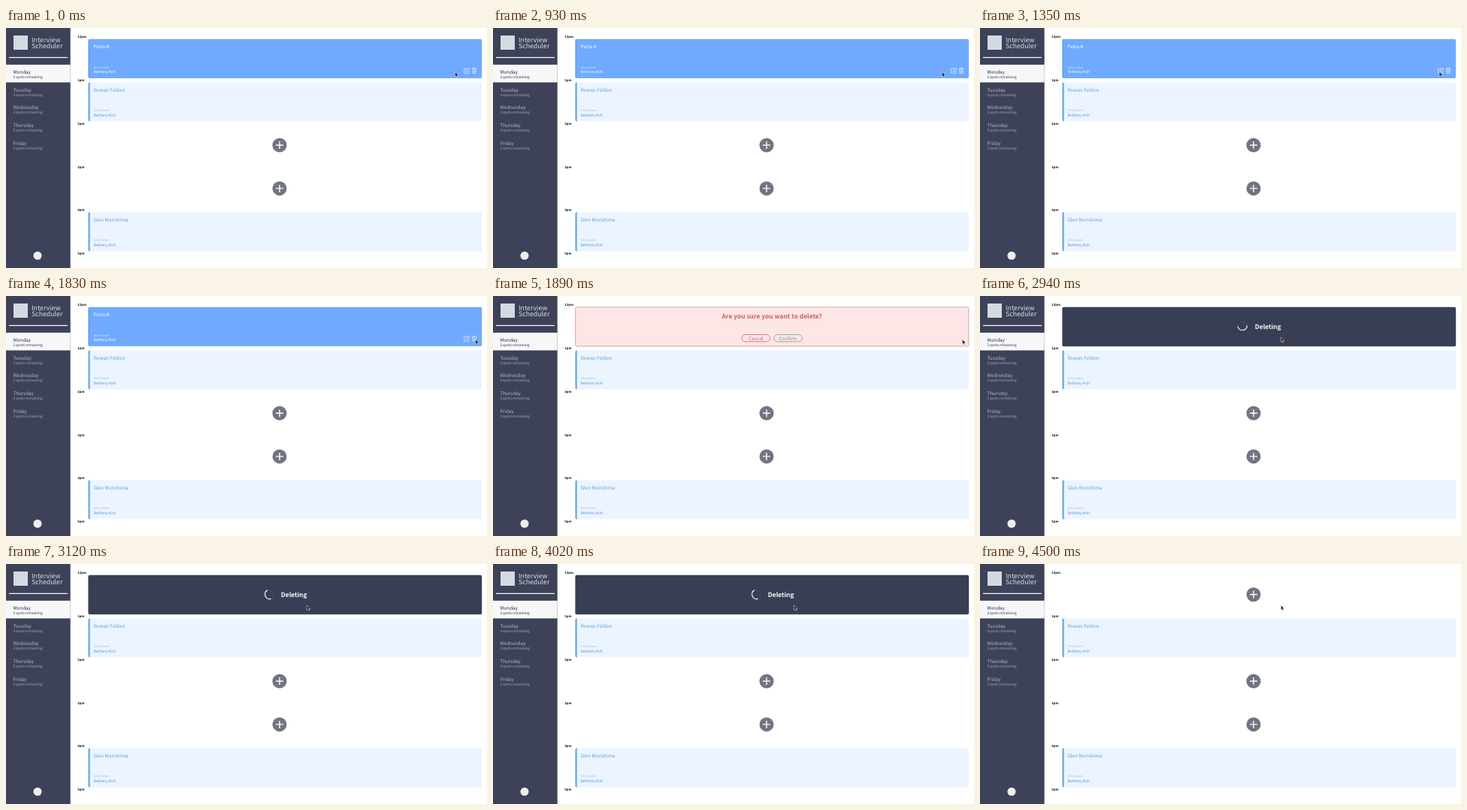
Animation of 640x320 px, one loop 5190 ms. Source, as an HTML page:

```html
<!DOCTYPE html>
<html lang="en">
<head>
<meta charset="utf-8">
<title>Interview Scheduler</title>
<style>
  html, body { margin: 0; width: 100%; height: 100%; overflow: hidden; background: #fff; }
  svg { display: block; width: 640px; height: 320px; }
  text {
    font-family: "Noto Sans CJK JP", "Noto Sans CJK SC", "Noto Sans CJK", "Open Sans", sans-serif;
    text-rendering: geometricPrecision;
  }
  .title { font-size: 8.75px; font-weight: 300; fill: #dde0e6; }
  .day { font-size: 6.3px; fill: #b4bac6; }
  .spots { font-size: 4.75px; fill: #a8aebb; }
  .on .day, .on .spots { fill: #2b3247; }
  .hour { font-size: 4.2px; font-weight: 700; fill: #0c0d10; }
  .name { font-size: 6.3px; fill: #5fa0dc; }
  .label { font-size: 3.95px; fill: #94c1ec; }
  .host { font-size: 4.93px; fill: #4a93d8; }
  .hover .name, .hover .host { fill: #fff; }
  .hover .label { fill: #d3e5ff; }
  .big { font-size: 8.4px; font-weight: 600; }
  .button { font-size: 6.3px; text-anchor: middle; }
  .icon { fill: none; stroke: #dceaff; stroke-width: .8; }
</style>
</head>
<body>
<svg id="stage" viewBox="0 0 640 320" xmlns="http://www.w3.org/2000/svg"></svg>
<script>
const LOOP = 5190;
const CONFIRM = 1860, DELETING = 2850, GONE = 4080;
const PITCH = 57.7;
const HOST = "Bethany Koh";

// time, x, y of the pointer tip
const PATH = [
  [0, 597.5, 58.7], [1170, 597.5, 58.7], [1530, 624.6, 58],
  [2190, 624.6, 58], [2370, 418.2, 47.4], [2550, 400.4, 55]
];

const text = (cls, x, y, s, extra = "") =>
  `<text class="${cls}" x="${x}" y="${y}" ${extra}>${s}</text>`;
const rect = (x, y, w, h, fill, extra = "") =>
  `<rect x="${x}" y="${y}" width="${w}" height="${h}" fill="${fill}" ${extra}/>`;

function card(row, name, hover) {
  const y = 14.7 + row * PITCH;
  const bg = hover ? "#70aaff" : "#ebf4ff";
  const edge = hover ? "#5a9bf0" : "#6badde";
  return `<g class="${hover ? "hover" : ""}">` +
    `<path d="M111.8 ${y}H631.2a2 2 0 0 1 2 2v48.2a2 2 0 0 1-2 2H111.8z" fill="${bg}"/>` +
    `<path d="M111.8 ${y}h-.4a2 2 0 0 0-2 2v48.2a2 2 0 0 0 2 2h.4z" fill="${edge}"/>` +
    text("name", 116.7, y + 12.3, name) +
    text("label", 116.7, y + 38.9, "Interviewer") +
    text("host", 116.7, y + 45.7, HOST) + "</g>";
}

function plus(row) {
  const y = 40.8 + row * PITCH;
  return `<circle cx="364" cy="${y}" r="9.5" fill="#717582"/>` +
    `<path d="M359 ${y}h10M364 ${y - 5}v10" stroke="#fff" stroke-width="1.4"/>`;
}

function button(cx, label, color) {
  return rect(cx - 18.8, 51.5, 37.6, 9.4, "none", `rx="4.7" stroke="${color}" stroke-width=".8"`) +
    text("button", cx, 58.6, label, `fill="${color}"`);
}

function sidebar() {
  const days = [["Monday", 2], ["Tuesday", 3], ["Wednesday", 3], ["Thursday", 5], ["Friday", 2]];
  const items = days.map(([day, n], i) => {
    const y = 60.8 + i * 23.7;
    return `<g class="${i ? "" : "on"}">` + text("day", 9.4, y, day) +
      text("spots", 9.4, y + 6.2, `${n} spots remaining`, i ? "" : 'id="count"') + "</g>";
  });
  return rect(0, 0, 85.7, 320, "#3d4258") +
    rect(10, 10, 19, 19, "#d3dae2") +
    text("title", 34, 18.7, "Interview") + text("title", 34, 27.2, "Scheduler") +
    rect(4, 38.8, 78, 1.2, "#fff") +
    rect(0, 48.9, 85.7, 23.6, "#f8f7f8") + items.join("") +
    '<circle cx="42" cy="303.5" r="5.5" fill="#eceef0"/>';
}

const hours = ["12pm", "1pm", "2pm", "3pm", "4pm", "5pm"]
  .map((h, i) => text("hour", 95.3, 13.4 + i * PITCH, h)).join("");

const booked = card(0, "Petra K.", true) +
  `<g class="icon">
    <path d="M614 54h-4.3v6.3h6.3v-3M612.3 58l.4-1.7 3.4-3.4 1.3 1.3-3.4 3.4z"/>
    <path d="M620 54.6h6M621.8 54.4v-1.2h2.4v1.2M620.6 54.8l.4 5.7h4l.4-5.7M622.2 56v3.3M623.8 56v3.3"/>
  </g>`;

const confirm = rect(109.7, 14.9, 523.2, 52.2, "#fde6e6", 'rx="2" stroke="#cf9296" stroke-width=".8"') +
  text("big", 371.2, 29.6, "Are you sure you want to delete?", 'text-anchor="middle" fill="#c8606a"') +
  button(349.8, "Cancel", "#d4606a") + button(392.6, "Confirm", "#6f9f9a");

const deleting = rect(109.4, 14.7, 523.8, 52.6, "#383e54", 'rx="2"') +
  `<g id="spinner" fill="none" stroke="#fff">
    <circle r="6.3" stroke-width=".8" opacity=".12"/>
    <path d="M-1.6-6.1A6.3 6.3 0 0 0 3.2 5.4" stroke-width="1.2"/>
  </g>` + text("big", 365.8, 44.2, "Deleting", 'fill="#fff"');

const views = [booked, confirm, deleting, plus(0)];

const $ = id => document.getElementById(id);
$("stage").innerHTML = rect(0, 0, 640, 320, "#fff") + sidebar() + hours +
  views.map((v, i) => `<g id="view${i}">${v}</g>`).join("") +
  card(1, "Rowan Feldon") + plus(2) + plus(3) + card(4, "Glen Morishima") +
  `<path id="pointer" d="M0 0V6.2L1.4 5 2.4 7.3 3.5 6.8 2.5 4.6H4.4Z"
    fill="#111" stroke="#fff" stroke-width=".5"/>`;

const ease = p => p * p * (3 - 2 * p);

function pointerAt(t) {
  const i = PATH.findIndex(p => p[0] > t);
  if (i < 0) return PATH[PATH.length - 1].slice(1);
  const [a, b] = [PATH[i - 1], PATH[i]];
  const p = ease((t - a[0]) / (b[0] - a[0]));
  return [a[1] + (b[1] - a[1]) * p, a[2] + (b[2] - a[2]) * p];
}

function draw(t) {
  const view = [CONFIRM, DELETING, GONE].filter(s => t >= s).length;
  views.forEach((_, i) => $("view" + i).setAttribute("display", i === view ? "inline" : "none"));
  $("count").textContent = `${view === 3 ? 3 : 2} spots remaining`;
  $("spinner").setAttribute("transform", `translate(349.3 41) rotate(${(t - 3120) * 0.4})`);
  $("pointer").setAttribute("transform", `translate(${pointerAt(t)})`);
}

const start = performance.now();
function tick() {
  draw((performance.now() - start) % LOOP);
  requestAnimationFrame(tick);
}
tick();
</script>
</body>
</html>
```
